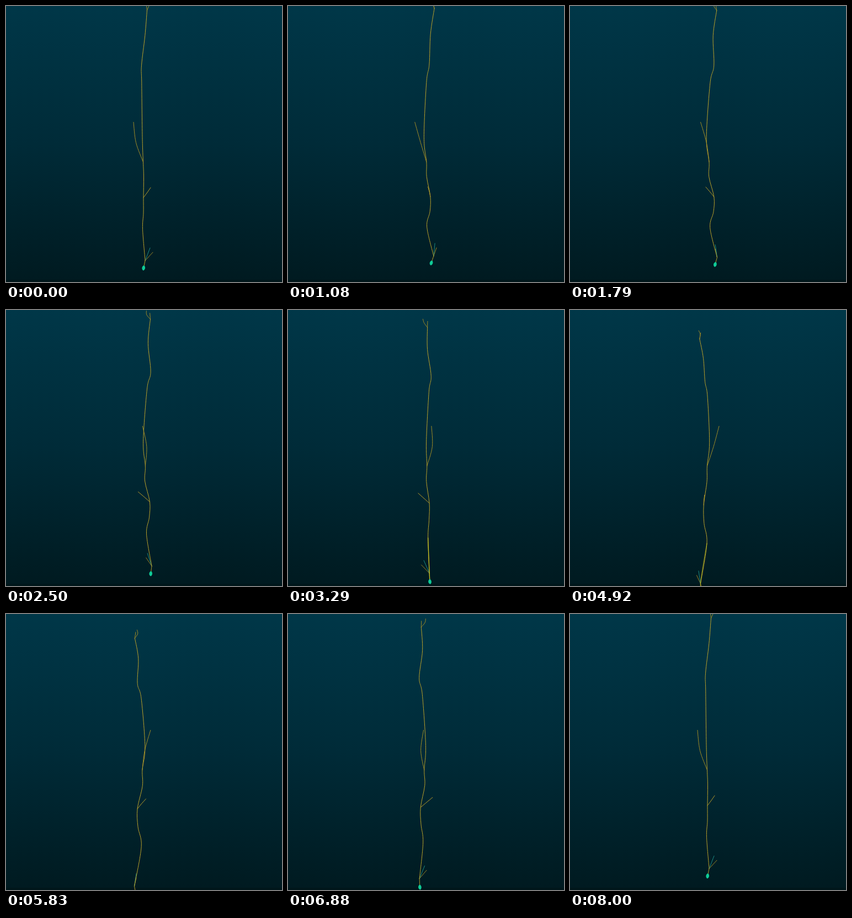
An HTML page with a canvas that plays this animation: 500 px wide and 500 px high, repeating every 8040 ms.

```html
<!DOCTYPE html>
<html lang="en">
<head>
<meta charset="utf-8">
<title>Rotating neuron</title>
<style>
  html, body { margin: 0; width: 100%; height: 100%; overflow: hidden; background: #001a20; }
  canvas { display: block; width: 500px; height: 500px; }
</style>
</head>
<body>
<canvas id="stage" width="500" height="500"></canvas>
<script>
const ctx = document.getElementById('stage').getContext('2d');
const LOOP = 8040, STEPS = 192, FPS = 24;
const AXIS_X = 249.5, PIVOT_Y = 282;
const GOLD = '#b99f2b', DIM = '#a08b27', TEAL = '#1c8f88', GREEN = '#0fcb97';
const RAD = Math.PI / 180;

// A point in space: offsets across and along the view, and height on the stage.
const at = (x, z, y) => ({ x, z, y });

const fork = at(6, 15.5, 23);
const side = at(-1, 2.7, 282);
const low = at(-0.5, 11.6, 349);
const joint = at(2.6, 16.8, 474);
const soma = at(-0.4, 13.5, 489.5);

// Key points between which the stem bends smoothly.
const stem = [
  fork, at(2.3, 9.5, 65), at(-4, 12, 115), at(-3.7, 5, 145), at(-2.5, -2, 238),
  side, at(0, 2.3, 310), low, at(-0.5, 10.6, 379), at(-2, 4.6, 411), joint
];

// Every branch runs from its root over an optional bend to its tip.
const branches = [
  { color: DIM, path: [fork, at(9.5, 9.7, 15), at(12.5, 10.5, 8)] },
  { color: DIM, path: [fork, at(4.7, 14, 12)] },
  { color: DIM, path: [side, at(-14, 0, 247), at(-18.5, -10, 210)] },
  { color: GOLD, path: [low, at(5.5, 4.3, 341), at(12.5, -5.6, 331)] },
  { color: DIM, path: [joint, at(16.5, 11.5, 459)] },
  { color: TEAL, path: [joint, at(11.5, 12, 451)] }
];

const backdrop = ctx.createLinearGradient(0, 0, 0, 500);
backdrop.addColorStop(0, '#003748');
backdrop.addColorStop(0.5, '#002b38');
backdrop.addColorStop(1, '#001a20');

// Vertical drift caused by perspective; it grows away from the pivot.
function drift(y, angle) {
  const upper = y < PIVOT_Y;
  const reach = (Math.abs(y - PIVOT_Y) / 255) ** 1.6;
  const c = Math.cos(angle - (upper ? 220 : 232) * RAD);
  return upper ? 23.5 * reach * (c + 0.2 * c * c) : 34 * reach * c;
}

function project(p, angle, anchor = p) {
  return {
    x: AXIS_X + p.x * Math.cos(angle) + p.z * Math.sin(angle),
    y: p.y + drift(anchor.y, angle) + 0.5
  };
}

// Smooth curve through all points (Catmull-Rom).
function curve(points, color, width = 1) {
  ctx.beginPath();
  ctx.moveTo(points[0].x, points[0].y);
  for (let i = 0; i < points.length - 1; i++) {
    const p = points[i], q = points[i + 1];
    const before = points[i - 1] || p, after = points[i + 2] || q;
    ctx.bezierCurveTo(
      p.x + (q.x - before.x) / 6, p.y + (q.y - before.y) / 6,
      q.x - (after.x - p.x) / 6, q.y - (after.y - p.y) / 6,
      q.x, q.y
    );
  }
  ctx.strokeStyle = color;
  ctx.lineWidth = width;
  ctx.stroke();
}

function drawSoma(neck, body) {
  ctx.save();
  ctx.translate(body.x, body.y);
  ctx.rotate(Math.atan2(neck.x - body.x, body.y - neck.y));
  ctx.beginPath();
  ctx.moveTo(0, -5);
  ctx.bezierCurveTo(4, -3, 3.5, 3, 0.5, 4.2);
  ctx.bezierCurveTo(-3.5, 3, -4, -3, 0, -5);
  ctx.fillStyle = GREEN;
  ctx.fill();
  ctx.restore();
}

function draw(angle) {
  ctx.fillStyle = backdrop;
  ctx.fillRect(0, 0, 500, 500);
  ctx.fillStyle = 'rgba(0, 8, 11, 0.25)';
  ctx.fillRect(0, 496, 500, 4);

  for (const { color, path } of branches) {
    curve(path.map(p => project(p, angle, path[0])), color);
  }
  const line = stem.map(p => project(p, angle));
  const body = project(soma, angle);
  const neck = line[line.length - 1];
  curve(line, GOLD);
  curve([neck, body], GOLD);

  // The lowest part brightens while it faces the viewer.
  ctx.globalAlpha = Math.max(0, -Math.cos(angle) * 2 - 1);
  curve([...line.slice(-2), body], '#e6df22', 1.3);
  ctx.globalAlpha = 1;
  drawSoma(neck, body);
}

ctx.lineJoin = ctx.lineCap = 'round';
const start = performance.now();

function tick() {
  const time = (performance.now() - start) % LOOP;
  const step = Math.min(STEPS, Math.floor((time + 4) * FPS / 1000));
  draw(step / STEPS * 2 * Math.PI);
  requestAnimationFrame(tick);
}
tick();
</script>
</body>
</html>
```
